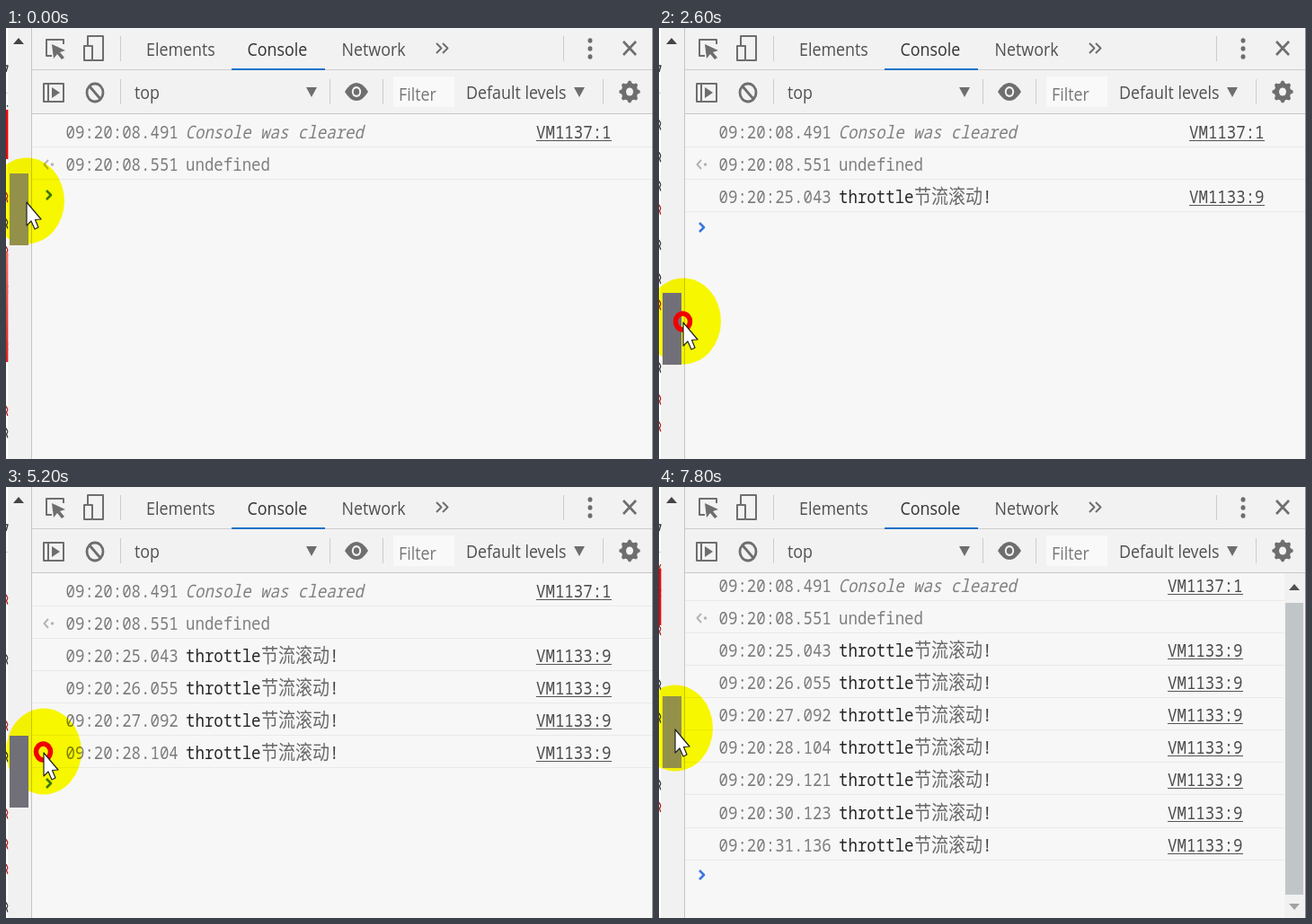
These frames come from a looping animation (720x480 px, 8 s). An HTML page with a canvas:

```html
<!DOCTYPE html>
<html lang="en">
<head>
<meta charset="utf-8">
<title>Throttled scrolling in the console</title>
<style>
  html, body { margin: 0; width: 100%; height: 100%; overflow: hidden; background: #f7f7f7; }
  canvas { display: block; width: 720px; height: 480px; }
</style>
</head>
<body>
<canvas id="stage" width="720" height="480"></canvas>
<script>
const ctx = document.getElementById('stage').getContext('2d');
const LOOP = 8000, STEP = 200, ASPECT = 0.875, PITCH = 36.08;
const SANS = '20.4px "Open Sans", "Noto Sans", sans-serif';
const MONO = '19.9px "Noto Sans Mono", monospace';
const CJK = '300 21.7px "Noto Sans CJK SC", "Noto Sans CJK", sans-serif';
const ICON = '#6e6e6e', LINE = '#cccccc';

// time, pointer x, pointer y, page scrollbar thumb top
const PATH = [
  [0, 23, 194, 162], [600, 23, 196, 162], [1600, 20, 293, 241], [2600, 27, 328, 295],
  [3600, 47, 327, 314], [5200, 42, 296, 277], [6000, 65, 259, 210],
  [7200, 18, 270, 233], [LOOP, 18, 270, 233]
];
const PRESS = [600, 7400];
const LOGS = [
  [1650, '25.043'], [2662, '26.055'], [3699, '27.092'], [4711, '28.104'],
  [5728, '29.121'], [6730, '30.123'], [7743, '31.136']
];
// top and height of the red blocks on the scrolled page
const BLOCKS = [[91, 55], [250, 122], [1144, 109], [1511, 63]];

function poseAt(t) {
  const i = PATH.findIndex((key, n) => n > 0 && t <= key[0]);
  const a = PATH[i - 1], b = PATH[i], p = (t - a[0]) / (b[0] - a[0]);
  const [, x, y, thumb] = a.map((v, n) => v + (b[n] - v) * p);
  return { x, y, thumb };
}

function box(x, y, w, h, color) {
  ctx.fillStyle = color;
  ctx.fillRect(x, y, w, h);
}

function text(str, x, y, color, font) {
  ctx.save();
  ctx.translate(x, y);
  ctx.scale(ASPECT, 1);
  ctx.font = font;
  ctx.fillStyle = color;
  ctx.fillText(str, 0, 0);
  ctx.restore();
}

function trace(points, close) {
  ctx.beginPath();
  for (const [x, y] of points) ctx.lineTo(x, y);
  if (close) ctx.closePath();
}

function poly(points, color) {
  trace(points, true);
  ctx.fillStyle = color;
  ctx.fill();
}

function stroke(points, color, width, close) {
  trace(points, close);
  ctx.strokeStyle = color;
  ctx.lineWidth = width;
  ctx.stroke();
}

function oval(x, y, rx, ry, color, lineWidth) {
  ctx.beginPath();
  ctx.ellipse(x, y, rx, ry, 0, 0, Math.PI * 2);
  ctx.fillStyle = ctx.strokeStyle = color;
  ctx.lineWidth = lineWidth || 1;
  if (lineWidth) ctx.stroke(); else ctx.fill();
}

function triangle(x, y, rx, h, color) {
  poly([[x - rx, y], [x + rx, y], [x, y + h]], color);
}

function drawPage(thumb) {
  box(0, 0, 28, 480, '#f2f1f1');
  box(0, 0, 2, 480, '#ffffff');
  box(0, 72, 2, 1, LINE);
  stroke([[0, 42], [2, 42], [0, 49]], '#333', 1.4);
  ctx.save();
  ctx.beginPath();
  ctx.rect(0, 86, 2.6, 394);
  ctx.clip();
  const scroll = (thumb - 162) * 20;
  const noise = n => Math.abs(Math.sin(n * 127.1) * 43758.5) % 1;
  for (let n = Math.floor(scroll / 34); n < scroll / 34 + 16; n++) {
    if (noise(n) < 0.35) continue;
    const y = n * 34 - scroll + noise(n + 0.5) * 14;
    stroke([[0, y], [2, y + 4], [0.5, y + 7], [2, y + 11]], noise(n + 0.2) < 0.45 ? '#b01818' : '#333', 1.3);
  }
  for (const [top, height] of BLOCKS) {
    const y = top - scroll;
    const tint = ctx.createLinearGradient(0, y, 0, y + height);
    tint.addColorStop(0, height > 110 ? '#f26a60' : '#f00000');
    tint.addColorStop(1, height > 110 ? '#e02020' : '#f00000');
    box(0, y, 2.6, height, tint);
  }
  ctx.restore();
  triangle(14, 18, 6, -7, '#444');
  box(28, 0, 1, 480, '#c6c4c6');
}

function drawInspectIcon() {
  ctx.lineJoin = 'round';
  stroke([[51, 31], [45, 31], [45, 13], [64, 13], [64, 18]], ICON, 2);
  poly([[51, 18], [66, 25], [60, 27], [65, 33], [62, 35], [57, 29], [53, 34]], ICON);
}

function drawDeviceIcon() {
  stroke([[91, 19], [91, 9], [108, 9], [108, 36], [97, 36]], ICON, 2);
  stroke([[87, 20], [96, 20], [96, 36], [87, 36]], ICON, 2, true);
}

function drawGear(x, y) {
  const points = [];
  for (let i = 0; i < 32; i++) {
    const r = i % 4 < 2 ? 12.4 : 9.8, a = (i - 0.5) * Math.PI / 16;
    points.push([x + Math.cos(a) * r * 0.94, y + Math.sin(a) * r]);
  }
  poly(points, ICON);
  oval(x, y, 4, 4.5, '#f3f3f3');
}

function drawEye(x, y) {
  ctx.beginPath();
  ctx.moveTo(x - 13, y);
  ctx.quadraticCurveTo(x - 7, y - 10, x, y - 10);
  ctx.quadraticCurveTo(x + 7, y - 10, x + 13, y);
  ctx.quadraticCurveTo(x + 7, y + 10, x, y + 10);
  ctx.quadraticCurveTo(x - 7, y + 10, x - 13, y);
  ctx.fillStyle = ICON;
  ctx.fill();
  oval(x, y, 5.2, 6, '#f3f3f3');
  oval(x, y, 3.2, 3.8, ICON);
}

function drawToolbars() {
  box(29, 0, 691, 96, '#f3f2f3');
  box(29, 46, 691, 1, LINE);
  box(29, 95, 691, 1, '#c8c8c8');
  for (const x of [127, 620]) box(x, 9, 1, 28, LINE);
  for (const x of [127, 360, 419, 664]) box(x, 57, 1, 28, LINE);

  drawInspectIcon();
  drawDeviceIcon();
  text('Elements', 156, 31, '#505050', SANS);
  text('Console', 268.5, 31, '#333', SANS);
  text('Network', 373.5, 31, '#505050', SANS);
  box(251, 45, 104, 2, '#1a73c8');
  for (const x of [479, 486]) stroke([[x, 17], [x + 5.5, 22.5], [x, 28]], ICON, 2);
  for (const y of [14, 23, 32]) oval(650, y, 2.5, 2.8, ICON);
  stroke([[687, 15], [701, 30]], ICON, 2.6);
  stroke([[701, 15], [687, 30]], ICON, 2.6);

  stroke([[42, 62], [64, 62], [64, 82], [42, 82]], ICON, 2, true);
  box(46, 62, 2, 20, ICON);
  poly([[51, 66], [60, 72], [51, 78]], ICON);
  oval(99, 72, 9, 10, ICON, 2.8);
  stroke([[93, 65], [105, 79]], ICON, 2.8);
  text('top', 143, 79, '#505050', SANS);
  triangle(340, 66, 6, 11, ICON);
  drawEye(390, 71);
  box(431, 54, 68, 34, '#f9f9f9');
  text('Filter', 437, 81, '#777', SANS);
  text('Default levels', 512, 79, '#505050', SANS);
  triangle(638, 66, 6, 11, ICON);
  drawGear(694, 71);
}

function drawConsole(t) {
  const logs = LOGS.filter(([at]) => at <= t);
  const overflow = logs.length === LOGS.length;
  const shift = overflow ? -6 : 0;
  const right = overflow ? 696 : 719;
  const linkX = overflow ? 566 : 590;

  const row = (n, stamp, link) => {
    const y = 123 + Math.round(PITCH * n) + shift;
    text('09:20:' + stamp, 66.5, y, '#7c7c7c', MONO);
    box(29, y + 9, right - 29, 1, '#e9e9e9');
    if (link) {
      text(link, linkX, y, '#4c4c4c', MONO);
      box(linkX, y + 2, 84, 1, '#555');
    }
    return y;
  };

  const y0 = row(0, '08.491', 'VM1137:1');
  text('Console was cleared', 199.5, y0, '#808080', 'italic ' + MONO);
  const y1 = row(1, '08.551');
  text('undefined', 200, y1, '#808080', MONO);
  stroke([[47, y1 - 12], [42.5, y1 - 7], [47, y1 - 2]], '#b4b4b4', 2);
  oval(51.5, y1 - 7, 1.8, 1.8, '#b4b4b4');
  logs.forEach(([, stamp], n) => {
    const y = row(n + 2, stamp, 'VM1133:9');
    text('throttle', 200, y, '#262626', MONO);
    text('节流滚动', 284, y, '#686868', CJK);
    text('!', 360, y, '#444', MONO);
  });

  const y = 186 + 36 * logs.length + shift;
  stroke([[45, y - 5], [50, y], [45, y + 5]], '#3b78e0', 2.6);

  if (overflow) {
    box(696, 96, 23, 384, '#f1f1f1');
    box(697, 129, 20, 325, '#c0c6c8');
    triangle(707, 115, 6, -7, '#505050');
    triangle(707, 464, 6, 7, '#a3a3a3');
  }
}

function drawPointer({ x, y, thumb }, pressed) {
  ctx.globalCompositeOperation = 'multiply';
  oval(x, y - 1.5, 42, 48, '#ffff00');
  ctx.globalCompositeOperation = 'source-over';
  box(4, thumb, 21, 80, pressed ? '#717078' : '#93904a');
  if (pressed) oval(x - 0.5, y - 1, 8, 9, '#f00000', 5.5);
  const arrow = [[0, 0], [0, 26], [5, 21], [9, 30], [13, 28], [9.5, 19.5], [16, 19]]
    .map(([dx, dy]) => [x + dx, y + dy]);
  poly(arrow, '#ffffff');
  stroke(arrow, '#222', 1.2, true);
}

function draw(t) {
  const pose = poseAt(t);
  box(0, 0, 720, 480, '#f7f7f7');
  drawPage(pose.thumb);
  drawConsole(t);
  drawToolbars();
  box(719, 0, 1, 480, '#8e8790');
  drawPointer(pose, t >= PRESS[0] && t < PRESS[1]);
}

const start = performance.now();
function tick() {
  const t = (performance.now() - start) % LOOP;
  draw(Math.floor(t / STEP) * STEP);
  requestAnimationFrame(tick);
}
tick();
</script>
</body>
</html>
```
